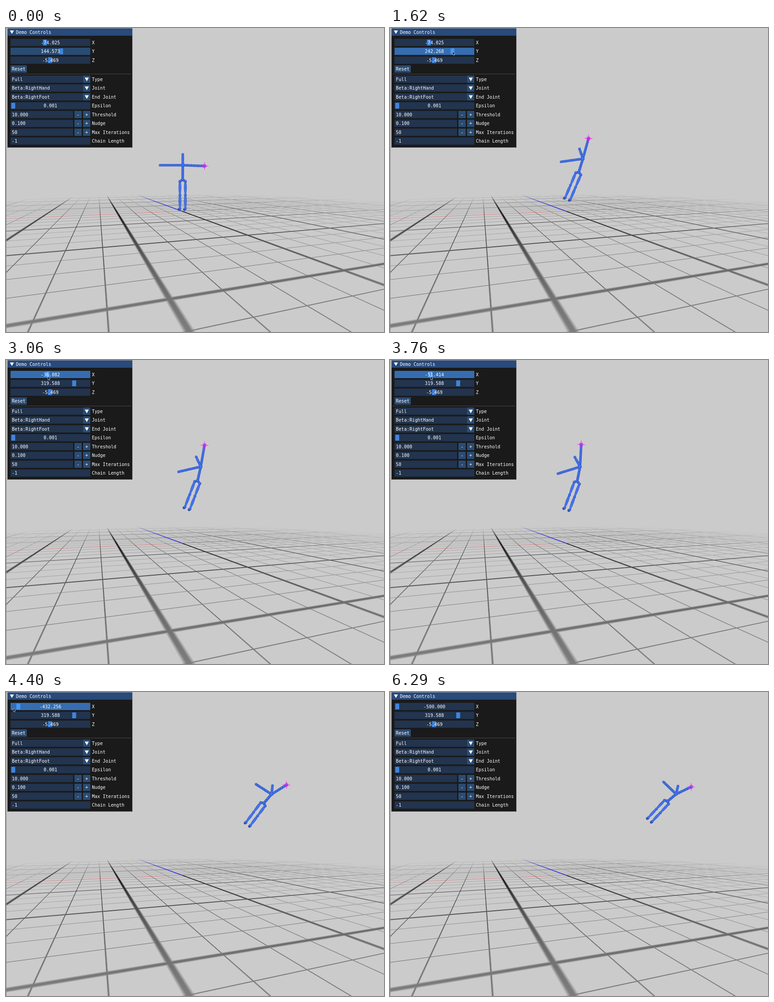
Recreate the animation shown at these times as an HTML page with a canvas. Size 834 by 671 pixels, loop 6.58 s.

```html
<!DOCTYPE html>
<html lang="en">
<head>
<meta charset="utf-8">
<title>Demo Controls</title>
<style>
html, body { margin: 0; width: 100%; height: 100%; overflow: hidden; background: #cbcbcb; }
canvas { display: block; }
</style>
</head>
<body>
<canvas id="stage" width="834" height="671"></canvas>
<script>
const W = 834, H = 671, LOOP = 6580;
const ctx = document.getElementById('stage').getContext('2d');
const clamp = (v, lo = 0, hi = 1) => Math.max(lo, Math.min(hi, v));
const mix = (a, b, k) => a + (b - a) * k;
const smooth = k => k * k * (3 - 2 * k);
const glide = k => smooth(clamp(k));

// Values between rows of [key, ...values]; `ease` shapes the way from row to row.
function between(rows, key, ease = k => k) {
  let i = 1;
  while (i < rows.length - 1 && key > rows[i][0]) i++;
  const [a, b] = [rows[i - 1], rows[i]];
  const k = ease((key - a[0]) / (b[0] - a[0]));
  return a.slice(1).map((v, j) => mix(v, b[j + 1], k));
}

// ---------- timeline ----------
// Bursts of activity: start, end, number of evenly spaced pictures.
const BURSTS = [[0, 0, 1], [410, 410, 1], [580, 580, 1], [950, 1510, 7], [1620, 2210, 7], [2290, 2580, 4],
  [3060, 3160, 2], [3680, 4320, 8], [4400, 4590, 3], [5000, 5520, 6], [5670, 5670, 1], [5960, 6040, 2],
  [6290, 6290, 1]];
function snap(time) {
  const [start, end, n] = BURSTS.filter(b => b[0] <= time).pop();
  if (n === 1) return start;
  const step = (end - start) / (n - 1);
  return start + step * Math.min(n - 1, Math.floor((time - start) / step + 0.1));
}

const X0 = -74.025, Y0 = 144.573, Z0 = -5.469;
const X_KEYS = [[3035, X0], [3060, -36.082], [3600, -36.082], [4046, -216.495], [4565, -500]];
const Y_KEYS = [[450, Y0], [540, 128.049], [983.37, 128.049], [2111, 319.588]];
const POINTER = [[410, 119, 52], [983, 119, 52], [2111, 150.5, 51.5], [2210, 150, 51], [2580, 100, 37],
  [3060, 92, 36], [3600, 92, 36], [4046, 59, 35], [4565, 2, 36], [5000, 171, 19], [5450, 646, 319],
  [5670, 385, 469], [6040, 422, 440]];
const LAG = 25; // the figure trails the sliders

// ---------- floor ----------
function drawFloor(c) {
  c.fillStyle = '#cbcbcb';
  c.fillRect(0, 0, W, H);
  const img = c.getImageData(0, 0, W, H), px = img.data;
  const line = (p, fw, w, least) => {
    const dist = Math.abs(p - Math.round(p));
    const half = Math.max(w, fw) / 2, soft = Math.max(fw, w * 0.5);
    return clamp((half - dist) / soft + 0.5) * clamp(w / fw, least, 1) * clamp(1.3 - 2 * fw);
  };
  const grid = (p, fw) => Math.max(line(p, fw, 0.0234, 0.25), line(p / 4, fw / 4, 0.028, 0.5));
  for (let y = 362; y < H; y++) {
    const q = y - 336;
    for (let x = 0; x < W; x++) {
      // Slopes towards the two vanishing points, then cell coordinates from the origin.
      const a = (x - 202) / q, b = (x - 1952) / q;
      const u = (a - 2.737) / 0.533, v = (b + 23.12) / 1.42;
      const fu = Math.hypot(1, a) / q / 0.533, fv = Math.hypot(1, b) / q / 1.42;
      const far = Math.hypot(u, v) / 20.8;
      if (far >= 1) continue;
      const fade = 1 - far ** 1.15;
      const gu = v < 0 && Math.abs(u) < 0.5 ? 0 : grid(u, fu);
      const gv = u < 0 && Math.abs(v) < 0.5 ? 0 : grid(v, fv);
      const shade = 203 * (1 - fade * Math.max(gu, gv));
      const red = u < 0 ? clamp(1 - Math.abs(v) / fv) * 0.65 * fade : 0;
      const blue = v < 0 ? clamp(1.25 - Math.abs(u) / fu) * fade : 0;
      const i = (y * W + x) * 4;
      px[i] = mix(mix(shade, 225, red), 25, blue);
      px[i + 1] = mix(mix(shade, 60, red), 25, blue);
      px[i + 2] = mix(mix(shade, 60, red), 225, blue);
    }
  }
  c.putImageData(img, 0, 0);
  c.fillStyle = '#8a8a8a';
  c.fillRect(0, 0, 1, H);
}

// ---------- panel ----------
const FRAME = '#22344e', HOVER = '#2a4c74', ACTIVE = '#356db0', GRAB = '#3d85e0', GRAB_ON = '#4296fa';
const ROW = 19.5;
const sliderY = i => 32 + i * ROW;

function text(c, s, x, y, align = 'left') {
  c.font = '9.95px "DejaVu Sans Mono", monospace';
  c.textBaseline = 'alphabetic';
  c.textAlign = align;
  c.fillStyle = '#fff';
  c.fillText(s, x, y + 3.7);
}
function box(c, x0, x1, y, color) {
  c.fillStyle = color;
  c.fillRect(x0, y - 8, x1 - x0, 16);
}
function down(c, x, y, w, h) {
  c.fillStyle = '#fff';
  c.beginPath();
  c.moveTo(x - w / 2, y - h / 2);
  c.lineTo(x + w / 2, y - h / 2);
  c.lineTo(x, y + h / 2);
  c.fill();
}
function slider(c, y, value, at, state = 0) {
  box(c, 10, 186, y, [FRAME, HOVER, ACTIVE][state]);
  c.fillStyle = state === 2 ? GRAB_ON : GRAB;
  c.fillRect(16 + at * 164 - 4.3, y - 6.4, 8.6, 12.8);
  text(c, value.toFixed(3), 98, y, 'center');
}
function drawPanel(c) {
  c.fillStyle = '#1a1a1a';
  c.fillRect(3, 1, 276, 263);
  c.fillStyle = '#294a7a';
  c.fillRect(3, 1, 276, 16);
  c.strokeStyle = 'rgba(110,110,128,.5)';
  c.lineWidth = 1;
  c.strokeRect(3.5, 0.5, 275, 263);
  c.fillStyle = '#47474f';
  c.fillRect(6, 101, 270, 1);
  down(c, 13, 9.3, 9, 7.5);
  text(c, 'Demo Controls', 22, 9);
  ['X', 'Y', 'Z'].forEach((s, i) => text(c, s, 189.5, sliderY(i)));
  box(c, 10, 46, 90.5, HOVER);
  text(c, 'Reset', 13, 90.5);

  const fields = [['Type', 'Full', 'combo'], ['Joint', 'Beta:RightHand', 'combo'],
    ['End Joint', 'Beta:RightFoot', 'combo'], ['Epsilon', 0.001, 'slider'],
    ['Threshold', '10.000', 'step'], ['Nudge', '0.100', 'step'],
    ['Max Iterations', '50', 'step'], ['Chain Length', '-1', 'plain']];
  fields.forEach(([label, value, kind], i) => {
    const y = 113 + i * ROW;
    text(c, label, 189.5, y);
    if (kind === 'slider') return slider(c, y, value, 0);
    box(c, 10, { combo: 170, step: 148, plain: 186 }[kind], y, FRAME);
    text(c, value, 13, y);
    if (kind === 'combo') {
      box(c, 170, 186, y, HOVER);
      down(c, 178.2, y + 0.5, 9, 8);
    }
    if (kind === 'step') {
      box(c, 151, 167, y, HOVER);
      box(c, 170, 186, y, HOVER);
      text(c, '-', 159, y, 'center');
      text(c, '+', 178, y, 'center');
    }
  });
}

// ---------- figure ----------
// Rows: slider value, size, then the angles of arm, spine, legs, free arm and head.
const HANG = [1, 100, 102.5, 111, 167, -115];
const BY_HEIGHT = [[Y0, 1, 182, 90.5, 90, 180, -90], [208, 1, 115.5, 110.5, 102.5, 174, -107],
  [236, 0.97, 105.5, 107, 113, 172, -109], [319.588, ...HANG]];
const BY_SIDE = [[-500, 0.77, 154.5, 140, 133, 224, -77], [-216.495, 0.9, 133, 109, 113, 187.5, -98],
  [X0, ...HANG]];

function go([x, y], deg, len) {
  const r = deg * Math.PI / 180;
  return [x + Math.cos(r) * len, y + Math.sin(r) * len];
}
const lerp = (a, b, k) => [mix(a[0], b[0], k), mix(a[1], b[1], k)];

function spindle(a, b, r, color) {
  const len = Math.hypot(b[0] - a[0], b[1] - a[1]);
  ctx.save();
  ctx.translate(...a);
  ctx.rotate(Math.atan2(b[1] - a[1], b[0] - a[0]));
  ctx.fillStyle = color;
  ctx.beginPath();
  ctx.moveTo(0, -r / 2);
  ctx.quadraticCurveTo(len * 0.35, -r * 1.5, len, -r / 2);
  ctx.lineTo(len, r / 2);
  ctx.quadraticCurveTo(len * 0.35, r * 1.5, 0, r / 2);
  ctx.fill();
  ctx.restore();
}
function disc(p, r, color) {
  ctx.fillStyle = color;
  ctx.beginPath();
  ctx.arc(p[0], p[1], r, 0, 7);
  ctx.fill();
}
const DARK = '#3056b8', LIGHT = '#4273f0';
function ball(p, r) {
  disc(p, r, DARK);
  disc([p[0] - 0.2, p[1] - 0.3], r - 0.7, LIGHT);
}
// A straight limb of n equal bones.
function limb(a, b, n, r) {
  const pts = Array.from({ length: n + 1 }, (_, i) => lerp(a, b, i / n));
  for (let i = 0; i < n; i++) {
    spindle(pts[i], pts[i + 1], r, DARK);
    spindle(pts[i], pts[i + 1], r - 0.7, LIGHT);
  }
  pts.forEach(p => ball(p, r));
}
function drawFigure(x, y) {
  const [size, arm, spine, legs, wave, nod] = x === X0 ? between(BY_HEIGHT, y) : between(BY_SIDE, x);
  const side = X0 - x;
  const hand = [438 + side * 0.532, 304.5 - (y - Y0) * 0.665 + side * 0.05];
  const chest = go(hand, arm, 48 * size);
  const waist = go(chest, spine, 36 * size);
  const pelvis = lerp(waist, chest, 0.12);
  [-6, 6].forEach(off => {
    const hip = go(waist, legs - 90, off);
    const foot = go(hip, legs, 60 * Math.sqrt(size));
    const toe = [foot[0] - 2, foot[1] + 1.8];
    disc(toe, 3, '#294a9a');
    limb(hip, foot, 2, 3.1);
    limb(pelvis, hip, 1, 3);
    disc(toe, 2, '#3357b4');
  });
  limb(chest, go(chest, wave, 50 * size), 6, 2.9);
  limb(chest, hand, 6, 2.9);
  limb(pelvis, chest, 4, 3);
  limb(chest, go(chest, nod, 23.5 * size), 2, 3);
  ball(chest, 3.8);
  drawTarget(...hand);
}
function drawTarget(x, y) {
  ctx.strokeStyle = 'rgba(255,20,250,.85)';
  ctx.lineWidth = 1.1;
  ctx.beginPath();
  ctx.moveTo(x - 8.5, y - 0.4);
  ctx.lineTo(x + 8.5, y + 0.4);
  ctx.moveTo(x, y - 8.5);
  ctx.lineTo(x, y + 8.5);
  ctx.moveTo(x + 4, y);
  ctx.arc(x, y, 4, 0, 7);
  ctx.stroke();
}

// ---------- pointer ----------
const ARROW = new Path2D('M.5 .5V12.5L3.2 10L5.2 14.5L7.2 13.6L5.3 9.3H9.3Z');
function drawPointer(x, y) {
  const s = x > 279 ? 1 : 0.6;
  ctx.save();
  ctx.translate(x, y);
  ctx.scale(s, s);
  ctx.fillStyle = '#000';
  ctx.fill(ARROW);
  ctx.strokeStyle = '#fff';
  ctx.lineWidth = 1;
  ctx.stroke(ARROW);
  ctx.restore();
}

// ---------- main ----------
const back = document.createElement('canvas');
back.width = W;
back.height = H;
const backCtx = back.getContext('2d');
drawFloor(backCtx);
drawPanel(backCtx);

function draw(now) {
  const t = snap(now % LOOP);
  const valueAt = time => [between(X_KEYS, time, glide)[0], between(Y_KEYS, time, glide)[0], Z0];
  const [px, py] = between(POINTER, t, glide);
  const held = t >= 580 && t < 2205 ? 1 : t >= 3060 && t < 5000 ? 0 : -1;
  const over = i => px >= 10 && px <= 186 && Math.abs(py - sliderY(i)) <= 8;

  ctx.drawImage(back, 0, 0);
  valueAt(t).forEach((v, i) => {
    const state = held === i ? 2 : held < 0 && over(i) ? 1 : 0;
    slider(ctx, sliderY(i), v, v / 1000 + 0.5, state);
  });
  const [x, y] = valueAt(t - LAG);
  drawFigure(x, y);
  const shown = (t >= 410 && t < 5515) || (t >= 5670 && t < 6290);
  if (shown) drawPointer(px, py);
}

const start = performance.now();
function tick() {
  draw(performance.now() - start);
  requestAnimationFrame(tick);
}
tick();
</script>
</body>
</html>
```
